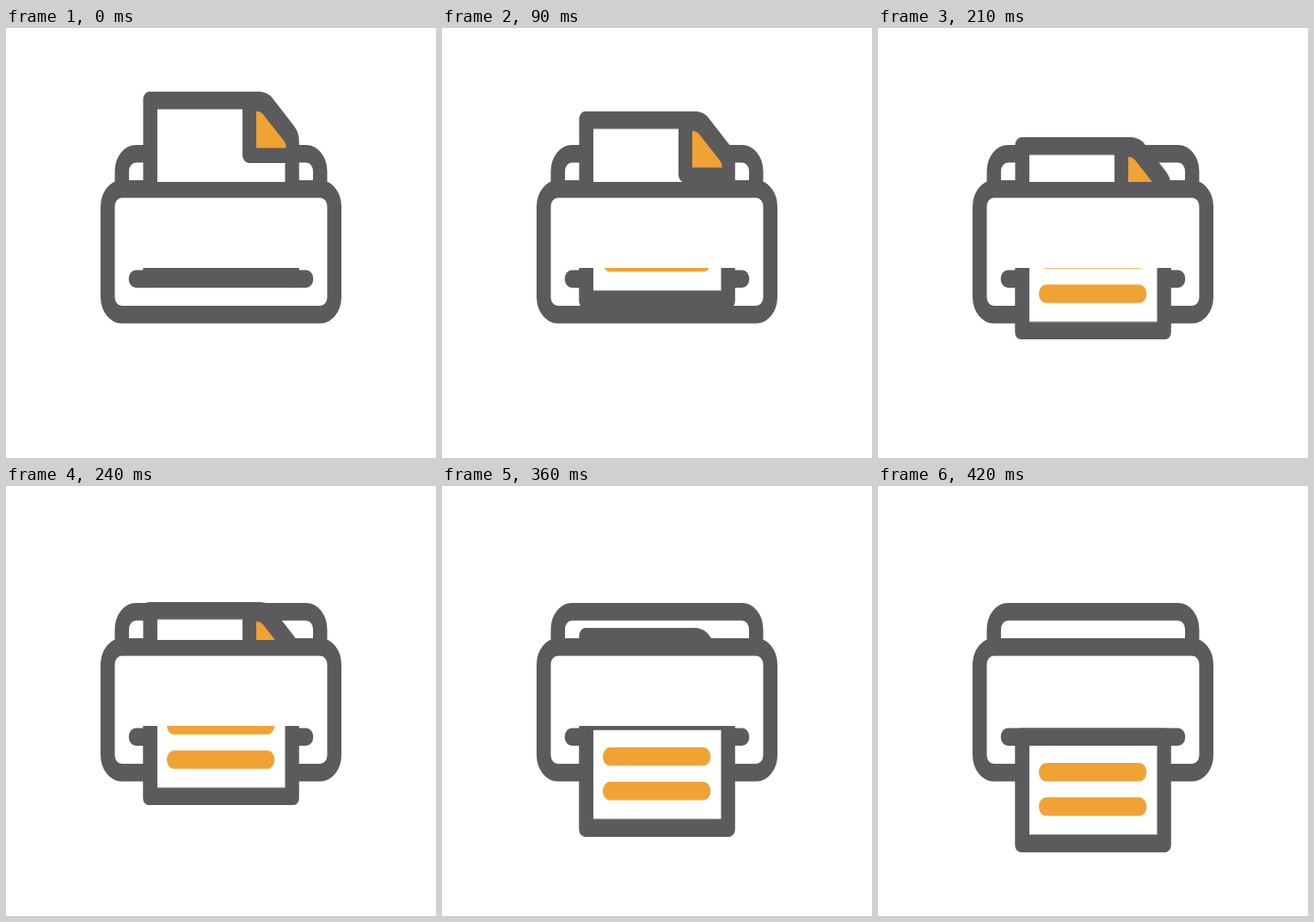
Animation of 500 by 500 pixels, one loop 2400 ms. Source, as an HTML page:

```html
<!DOCTYPE html>
<html lang="en">
<head>
<meta charset="utf-8">
<title>Printer</title>
<style>
  html, body { margin: 0; width: 100%; height: 100%; overflow: hidden; background: #fff; }
  svg { display: block; width: 100%; height: 100%; }
  .ink { fill: #5b5b5d; }
  .gap { fill: #fff; }
  .accent { fill: #f0a235; }

  .sheet, .print { animation: feed 2400ms infinite; }
  .sheet { --from: 0px; --to: 106.2px; }
  .print { --from: -127.4px; --to: 0px; }

  /* 14 equal steps in 420 ms, then a rest */
  @keyframes feed {
    0% { transform: translateY(var(--from)); animation-timing-function: steps(14, end); }
    17.5%, 100% { transform: translateY(var(--to)); }
  }
</style>
</head>
<body>
<svg viewBox="0 0 500 500">
  <defs>
    <clipPath id="above"><rect width="500" height="179"/></clipPath>
    <clipPath id="below"><rect y="279" width="500" height="221"/></clipPath>
  </defs>

  <!-- back tray -->
  <rect class="ink" x="126.5" y="136" width="247" height="90" rx="24.5" ry="30.5"/>
  <path class="gap" d="M143 177V166.5A8 10 0 0 1 151 156.5H349A8 10 0 0 1 357 166.5V177Z"/>

  <!-- body and slot -->
  <rect class="ink" x="110" y="177" width="280" height="166.5" rx="24.5" ry="30.5"/>
  <rect class="gap" x="126.5" y="197.5" width="247" height="125.5" rx="8" ry="10"/>
  <rect class="ink" x="142.7" y="281.5" width="214.6" height="20.5" rx="8.2" ry="10.25"/>

  <!-- blank sheet going in -->
  <g clip-path="url(#above)">
    <g class="sheet">
      <path class="ink" d="M159.5 200V83A7 9 0 0 1 166.5 74H293C299 74 304.500 75.500 309 80.500L335 114C339 119 340.800 125 340.800 132V200Z"/>
      <path class="gap" d="M176 94.500H275V148A7.500 9 0 0 0 282.500 157H324.500V200H176Z"/>
      <path class="accent" d="M291 96.700C294.500 96.700 297 98 299 100.500L323 131C325 133.500 325.700 136 325.700 139.500H291Z"/>
    </g>
  </g>

  <!-- printed sheet coming out -->
  <g clip-path="url(#below)">
    <g class="print">
      <rect class="ink" x="159.300" y="281.500" width="181.500" height="144.500" rx="7" ry="8.500"/>
      <rect class="gap" x="176" y="302" width="148.500" height="103.300"/>
      <rect class="accent" x="187" y="322" width="125.300" height="21.600" rx="8.500" ry="10.800"/>
      <rect class="accent" x="187" y="362" width="125.300" height="21.600" rx="8.500" ry="10.800"/>
    </g>
  </g>
</svg>
</body>
</html>
```
